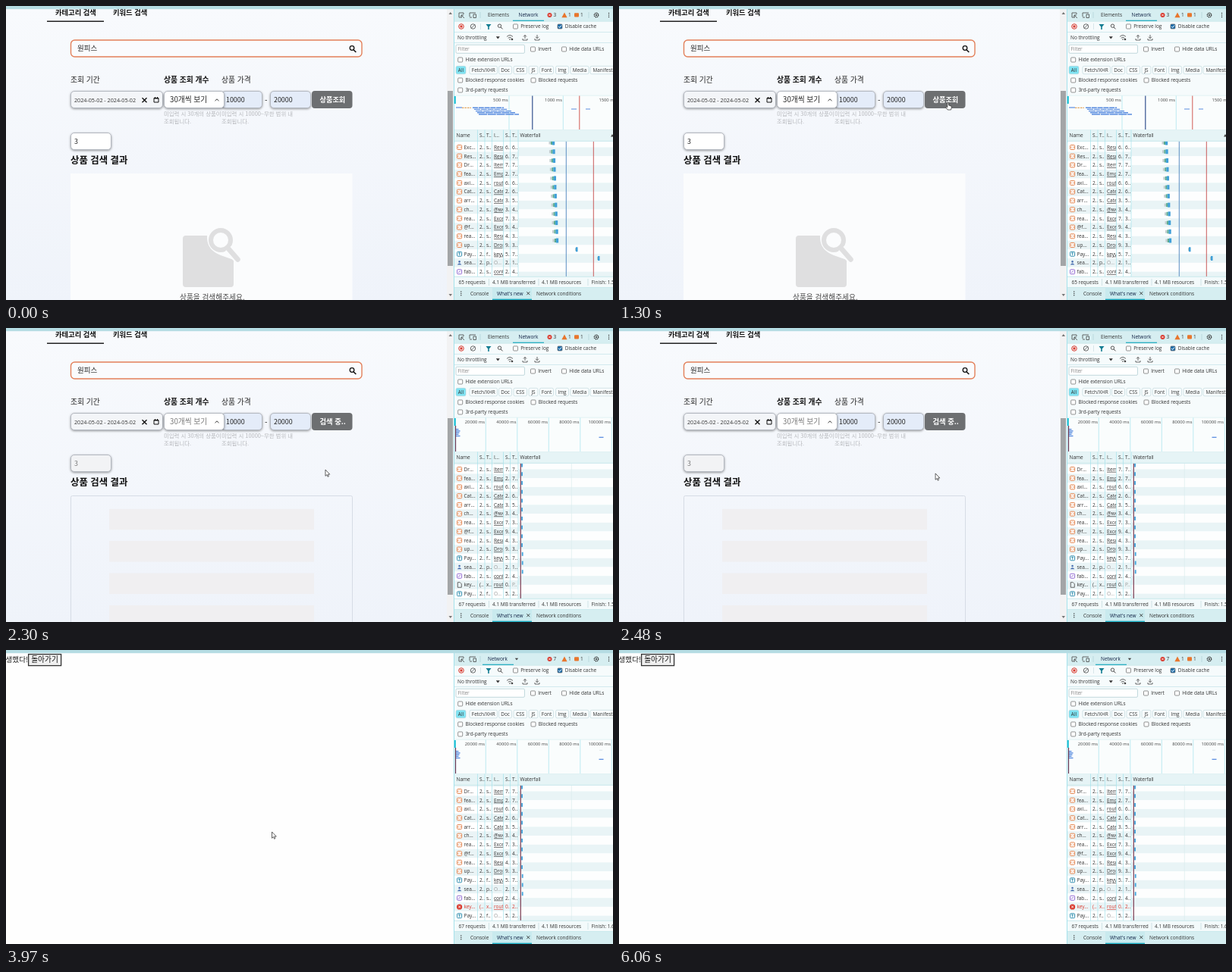
An HTML page for the animation above (6420 ms loop, 800 px wide and 388 px high).

```html
<!DOCTYPE html>
<html lang="ko">
<head>
<meta charset="utf-8">
<style>
html, body { margin: 0; width: 100%; height: 100%; overflow: hidden; background: #fefefe }
svg { display: block; width: 800px; height: 388px }
text { white-space: pre }
.page text { font-family: "Noto Sans CJK KR", "Noto Sans CJK", "Noto Sans", sans-serif }
.tools text { font-family: "Open Sans", "Noto Sans", sans-serif }
.lift { filter: drop-shadow(0 1px 1.5px #0006) }
</style>
</head>
<body>
<svg viewBox="0 0 800 388">
  <defs>
    <linearGradient id="sky" x2="0" y2="1"><stop stop-color="#f8fafd"/><stop offset="1" stop-color="#eff3fa"/></linearGradient>
    <linearGradient id="shine"><stop stop-color="#d4d4d6" stop-opacity="0"/><stop offset=".5" stop-color="#d4d4d6"/><stop offset="1" stop-color="#d4d4d6" stop-opacity="0"/></linearGradient>
    <clipPath id="view"><path d="M0 4H581V388H0Z"/></clipPath>
    <clipPath id="bars"><path id="barShape"/></clipPath>
    <clipPath id="list"><path d="M591 178.5H800V357H591Z"/></clipPath>
    <clipPath id="link"><path d="M641 0H655.5V500H641Z"/></clipPath>
  </defs>
  <g class="page" id="page"></g>
  <g class="tools" id="tools"></g>
  <g id="cursor"></g>
</svg>
<script>
const $ = id => document.getElementById(id);
const LOOP = 6420, SEARCH = 1520, FAIL = 3520, ROW = 11.73;

// markup helpers; text is placed by its vertical centre
const text = (x, y, s, size = 6.5, fill = '#333', weight = 400, more = '') =>
  `<text x="${x}" y="${y + size * .36}" font-size="${size}" fill="${fill}" font-weight="${weight}" ${more}>${s}</text>`;
const rect = (x, y, w, h, fill, more = '') =>
  `<rect x="${x}" y="${y}" width="${w}" height="${h}" fill="${fill}" ${more}/>`;
const line = (d, stroke = '#444', width = .8, more = '') =>
  `<path d="${d}" fill="none" stroke="${stroke}" stroke-width="${width}" ${more}/>`;
const shape = (d, fill) => `<path d="${d}" fill="${fill}"/>`;
const dot = (x, y, r, fill, more = '') => `<circle cx="${x}" cy="${y}" r="${r}" fill="${fill}" ${more}/>`;
// shown only in the listed phases: i idle, b busy, e error
const on = (phases, s) => `<g data-on="${phases}">${s}</g>`;
const each = (n, f) => Array.from({ length: n }, (_, i) => f(i)).join('');

const field = (x, y, w, fill, lift = true) =>
  rect(x + .5, y + .5, w - 1, 22, fill, `rx="4.5" stroke="#b3b8c0" ${lift ? 'class="lift"' : ''}`);
const skeletonY = i => 238.7 + 42.4 * i;

function form() {
  const hint = '#b5b7bb';
  return text(65, 9, '카테고리 검색', 9.3, '#111', 700) + text(141, 9, '키워드 검색', 9.3, '#111', 700) +
    rect(54, 19.5, 75, 1.5, '#222') +
    rect(85.5, 45, 383.5, 22, '#fafbfd', 'rx="5" stroke="#e3805a" stroke-width="1.4"') +
    text(94, 56, '원피스', 9.5, '#222') +
    dot(456, 55.5, 2.8, 'none', 'stroke="#111" stroke-width="1.3"') + line('M458 57.7L461.3 61', '#111', 1.6) +
    text(85, 97, '조회 기간', 9.8, '#222', 500) + text(208, 97, '상품 조회 개수', 9.8, '#111', 700) +
    text(284, 97, '상품 가격', 9.8, '#222', 500) +
    field(85, 112, 122, '#f3f5f8') +
    text(90, 124, '2024-05-02 - 2024-05-02', 7.2, '#333', 400, 'style="font-family:\'Open Sans\',sans-serif"') +
    line('M179.5 121.2L185.5 127.2M185.5 121.2L179.5 127.2', '#111', 1.4) +
    line('M195 121.5H201V127H195ZM195 122H201M196.5 120V121M199.5 120V121', '#111', 1) +
    field(284, 112, 54, '#e4ecf9') + text(290, 124, '10000', 8.9, '#222') +
    field(208, 112, 80, '#fff') +
    on('i', text(216, 124, '30개씩 보기', 9.7, '#222')) + on('b', text(216, 124, '30개씩 보기', 9.7, '#777')) +
    line('M275.5 125.2L278 122.8L280.5 125.2', '#333', 1) +
    text(341, 124, '-', 10, '#222') +
    field(348, 112, 54, '#e4ecf9') + text(353, 124, '20000', 8.9, '#222') +
    rect(403, 112, 53.5, 23, '#6d6f71', 'rx="4"') +
    on('i', text(413.5, 123.5, '상품조회', 9.2, '#fff', 700)) +
    on('b', text(413.5, 123.5, '검색 중..', 9.3, '#fff', 700)) +
    text(208, 142.5, '미입력 시 30개의 상품이', 7.4, hint) + text(208, 152.5, '조회됩니다.', 7.4, hint) +
    text(284, 142.5, '미입력 시 10000~무한 범위 내', 7.4, hint) + text(284, 152.5, '조회됩니다.', 7.4, hint) +
    on('i', field(85, 167, 54, '#fff') + text(90, 179, '3', 8.9, '#222')) +
    on('b', field(85, 167, 54, '#f2f3f5') + text(90, 179, '3', 8.9, '#777')) +
    text(85, 204, '상품 검색 결과', 12.4, '#111', 700);
}

function results() {
  const grey = '#dfdfe0';
  return on('i', rect(85, 221, 371.5, 200, '#fbfcfd') +
      shape('M237 303H265Q264 322 283 329L300 335V367Q300 371 296 371H237Q233 371 233 367V307Q233 303 237 303Z', grey) +
      dot(283, 309, 17, '#fbfcfd') + dot(283, 309, 13, 'none', `stroke="${grey}" stroke-width="6"`) +
      line('M293 320L305 334', '#fbfcfd', 11) + line('M292 319L305.5 334.5', grey, 6.5, 'stroke-linecap="round"') +
      text(229, 384.5, '상품을 검색해주세요.', 9.7, '#444')) +
    on('b', rect(85.5, 221.5, 371, 193, 'none', 'rx="2" stroke="#d6dce5"') +
      `<g clip-path="url(#bars)">${rect(136, 230, 270, 180, '#f0eff1')}<g id="sweep">${rect(-9, 230, 18, 180, 'url(#shine)')}</g></g>`);
}

$('barShape').setAttribute('d', each(4, i => `M136 ${skeletonY(i)}h270v27.5h-270z`));
$('page').innerHTML = rect(0, 0, 800, 388, '#fefefe') +
  on('ib', rect(0, 4, 581, 384, 'url(#sky)') +
    `<g clip-path="url(#view)"><g id="scroll">${rect(0, 414, 581, 50, '#fafbfd')}${form()}${results()}</g></g>` +
    rect(581, 4, 9.5, 384, '#f2f2f3') + '<rect id="thumb" x="582" width="7" fill="#a3a5a7"/>' +
    shape('M583.5 11L585.8 8L588 11ZM583.5 380L585.8 383L588 380Z', '#777')) +
  on('e', text(-.5, 13, '생했다!', 9.6, '#222') +
    rect(29.6, 5.6, 43, 15, '#f0f0f0', 'stroke="#333" stroke-width="1.3"') + text(33.2, 13, '돌아가기', 9.7, '#111'));

const check = (x, y, s, ticked) =>
  rect(x - 3, y - 3, 6, 6, ticked ? '#1a6fb0' : '#fff', 'rx="1" stroke="#666" stroke-width=".7"') +
  (ticked ? line(`M${x - 1.8} ${y}l1.4 1.5 2.5 -3`, '#fff', 1) : '') + text(x + 6.7, y, s);

function toolbar() {
  const badges = n => dot(716.5, 12, 3, '#d93a2f') + line('M715.3 10.8l2.4 2.4M717.7 10.8l-2.4 2.4', '#fff', .8) + text(721.5, 12, n) +
    shape('M736 8.6L739.6 15.2H732.4Z', '#e8762d') + text(741, 12, 1) +
    rect(749, 9.2, 6, 5.4, '#e8762d', 'rx="1"') + text(757, 12, 1);
  const chips = [['All', 593, 13], ['Fetch/XHR', 611, 36.5], ['Doc', 649.5, 17], ['CSS', 669, 17.5], ['JS', 689, 12], ['Font', 703.5, 18], ['Img', 724.5, 17], ['Media', 744, 24], ['Manifest', 770, 33]];
  return rect(591, 4, 209, 16, '#d6eef1') +
    line('M601 15H597V9H603V11M600 12L604 16M600 12V15M600 12H603') + line('M611 14V9H619M614 15H611M616 11H619.5V15.5H616Z') +
    line('M625 8V16', '#a9ccd2', .6) +
    on('ib', text(635, 12, 'Elements') + text(675.5, 12, 'Network', 6.5, '#124') + rect(668, 18.7, 41, 1.5, '#19a8be')) +
    on('e', text(635, 12, 'Network', 6.5, '#124') + rect(628, 18.7, 41, 1.5, '#19a8be') +
      shape('M670.8 10.8H675.2L673 13.6Z', '#444')) +
    on('ib', badges(3)) + on('e', badges(7)) +
    line('M768 8V16', '#a9ccd2', .6) +
    dot(778, 12, 2.7, 'none', 'stroke="#333" stroke-width="1.4" stroke-dasharray="1.4 .7"') + dot(778, 12, 1.1, '#333') +
    each(3, i => dot(794.5, 9.5 + 2.5 * i, .7, '#333')) +
    rect(591, 20, 209, 98, '#f6fbfc') + line('M591 20.3H800M591 34.5H800M591 48.5H800M591 118.3H800M591 163.3H800', '#c3e4e9', .7) +
    dot(600, 27, 3.3, 'none', 'stroke="#d93a2f"') + rect(598.5, 25.5, 3, 3, '#d93a2f') +
    dot(615.5, 27, 3.2, 'none', 'stroke="#444" stroke-width=".8"') + line('M613.2 29.3L617.8 24.7') +
    line('M625.5 23V31', '#c3d8dc', .6) + shape('M632.5 24H639.5L636.8 27.4V31H635.2V27.4Z', '#147d92') +
    dot(650.5, 26.2, 2.2, 'none', 'stroke="#444" stroke-width=".9"') + line('M652 27.8L654.5 30.4', '#444', 1) +
    check(671.5, 27, 'Preserve log') + check(730, 27, 'Disable cache', true) +
    text(595, 42, 'No throttling') + shape('M645.8 40.3H650.8L648.3 43.6Z', '#333') +
    line('M660 40.5Q664 36.5 668 40.5M661.7 42.3Q664 40 666.3 42.3') + dot(664, 44, .8, '#444') + dot(667, 44, 1.3, '#444') +
    line('M684 43V38.5M682 40.5L684 38.4L686 40.5M681 43V45H687V43M700 38V42.5M698 40.7L700 42.8L702 40.7M697 43V45H703V43') +
    rect(593, 51.3, 90.5, 11, '#fff', 'rx="1.5" stroke="#a9c9cf" stroke-width=".7"') + text(595.5, 57, 'Filter', 6.5, '#888') +
    check(694.5, 57, 'Invert') + check(735.5, 57, 'Hide data URLs') + check(598.7, 71, 'Hide extension URLs') +
    chips.map(([s, x, w], i) => rect(x, 79.3, w, 10.5, i ? '#f8fcfd' : '#7fe3f2', 'rx="2" stroke="#b9d3d8" stroke-width=".6"') +
      text(x + w / 2, 84.5, s, 6.4, '#333', 400, 'text-anchor="middle"')).join('') +
    check(598.7, 98, 'Blocked response cookies') + check(695, 98, 'Blocked requests') + check(598.7, 111, '3rd-party requests');
}

function overview() {
  const ticks = (step, first, gap, n) => each(n, i => line(`M${first + gap * i} 118.5V163`, '#a5e2ec', .7) +
    text(first - 1.3 + gap * i, 124, `${step * (i + 1)} ms`, 5.8, '#444', 400, 'text-anchor="end"'));
  const blue = '#5a8de0';
  return rect(591, 118.5, 209, 44.5, '#fafdfd') +
    on('i', ticks(500, 663, 71.3, 3) + line('M593 134H601', blue, 1.2) + line('M601 134.3H613', '#e2a660', 1.2, 'stroke-dasharray="2.5 1"') +
      each(5, i => line(`M${615 + i * 2} ${134.2 + i * 2.2}H${656 + i * 5}`, blue, 1.4, `stroke-dasharray="${7 + i} .8"`)) +
      line('M745 136H752M764 136H770', blue, 1.2) +
      line('M693.8 118.5V163', '#34508f', 1.2) + line('M755.8 118.5V163', '#d05a55', 1)) +
    on('be', ticks(20000, 632.3, 41.5, 5) +
      each(5, i => line(`M593 ${133.7 + i * 2.2}H${596.5 + (i * 2) % 3}`, blue, 1.4)) +
      line('M592.5 129V163', '#5a3350', 1.2) + `<g id="late">${line('M781.5 144.3H787.5', blue, 1.3)}</g>`) +
    on('e', line('M782 132.3H786', '#c9d6dc', .6)) +
    rect(590.8, 119, 2, 10, '#19c0d4');
}

const rows = ['Exc s Resu 6 6', 'Res s Resu 6 7', 'Dr s Item 7 7', 'fea s Emp 2 7', 'axi s rout 6 6', 'Cat s Cate 2 6', 'arr s Cate 3 5', 'ch s @we 3 4',
  'rea s Exce 7 3', '@f s Exce 9 4', 'rea s Resu 4 3', 'up s Drop 9 3', 'Pay f keyv 5 7', 'sea p O… 2 1', 'fab s cont 2 4', 'key x rout 0 P', 'Pay f O… 5 2'];

function icon(i, y) {
  const box = (color, inner) => rect(594.6, y - 3, 6, 6, '#fff', `rx="1" stroke="${color}" stroke-width=".9"`) + inner;
  if (i < 12) return box('#e07a3f', line(`M596.7 ${y - 1.3}l-1 1.3 1 1.3M598.5 ${y - 1.3}l1 1.3 -1 1.3`, '#e07a3f', .7));
  if (i == 12 || i == 16) return box('#1e84a8', line(`M596 ${y - 1.4}h3.2M597.6 ${y - 1.4}v3.2`, '#1e84a8', .8));
  if (i == 13) return dot(597.6, y - 1.6, 1.3, '#4a6fb0') + shape(`M594.8 ${y + 2.6}q2.8 -4 5.6 0z`, '#4a6fb0');
  if (i == 14) return box('#8a5fd0', line(`M596 ${y + 1.5}l3 -3`, '#8a5fd0', .9));
  return on('b', line(`M595.3 ${y - 3.3}h3l2 2v4.6h-5z`, '#444', .8)) +
    on('e', dot(597.6, y, 3.6, '#d93a2f') + line(`M596.2 ${y - 1.4}l2.8 2.8M599 ${y - 1.4}l-2.8 2.8`, '#fff', .9));
}

function row(s, i) {
  const [name, type, from, size, time] = s.split(' '), y = 186.5 + ROW * i;
  const cells = (color, last) => text(603.5, y, name + '...', 6.5, color) + text(624, y, i == 15 ? '(..' : '2..', 6.5, color) +
    text(633, y, type + '..', 6.5, color) +
    (from == 'O…' ? text(643, y, 'O...', 6.5, '#999')
      : text(643, y, from, 6.5, color, 400, 'text-decoration="underline" clip-path="url(#link)"')) +
    text(658, y, size + '..', 6.5, color) + text(667, y, last + '..', 6.5, last == 'P' ? '#999' : color);
  return rect(591, y - ROW / 2, 84, ROW, i % 2 ? '#eaf4f6' : '#fff') +
    (i == 15 ? on('b', cells('#333', 'P')) + on('e', cells('#d93a2f', 2)) : cells('#333', time)) + icon(i, y);
}

// the chart rows sit half a row above the text rows
function waterfall() {
  const top = i => 177.5 + ROW * i;
  const mark = i => i < 12
    ? rect(715.5 + i * .45, top(i) + 1, 2.5, 4, '#c3cdd0') + rect(718 + i * .45, top(i) + .5, 2, 5, '#58ab8d') + rect(720 + i * .45, top(i), 3.2, 6, '#3f9fd8')
    : rect(i == 12 ? 751 : 780, top(i), 2.5, 6, '#3f9fd8') + rect(i == 12 ? 750 : 779, top(i) + 1, 1, 4, '#b5c8c8');
  return rect(675, 178, 125, 180, '#fff') + each(16, i => rect(675, 174.7 + ROW * i, 125, ROW, i % 2 ? '#e9f4f6' : '#fdfefe')) +
    on('i', each(14, mark) + line('M738.3 178V357', '#5d8fc4', 1) + line('M774.3 178V357', '#c85a5a', 1)) +
    on('be', line('M745.3 178V357', '#dcebee', .7) + line('M678.3 178V357', '#7a3b52', 1.2) +
      each(13, i => rect(679.2 + (i > 9 ? .6 : 0), top(i) + 1, 1.8, 5, '#3f9fd8')));
}

function table() {
  const columns = [621.5, 631, 640.5, 655.5, 664.5, 675];
  const moved = rows.map(row).join('');
  return `<g clip-path="url(#list)">${on('i', moved)}${on('be', `<g transform="translate(0 ${-2 * ROW})">${moved}</g>`)}${waterfall()}</g>` +
    rect(591, 163.5, 209, 15, '#e6f4f6') + line('M591 178.3H800', '#b9e2e8', .7) +
    columns.map(x => line(`M${x} 163.5V357`, '#a5e2ec', .7)).join('') +
    [['Name', 593.5], ['S..', 624], ['T..', 633], ['I...', 643], ['S..', 658], ['T..', 667], ['Waterfall', 677.5]].map(([s, x]) => text(x, 171, s)).join('') +
    on('i', shape('M797 172.5L799 169L801 172.5Z', '#444'));
}

function footer() {
  return rect(591, 357, 209, 31, '#f3fafb') + line('M591 357.3H800M591 371.5H800', '#b9e2e8', .7) +
    on('i', text(596.5, 364.5, '65 requests')) + on('be', text(596.5, 364.5, '67 requests')) +
    text(641, 364.5, '4.1 MB transferred') + text(706, 364.5, '4.1 MB resources') +
    on('ib', text(771.5, 364.5, 'Finish: 1.5')) + on('e', text(771.5, 364.5, 'Finish: 1.6')) +
    line('M636.5 360V369M702 360V369M767 360V369', '#b9d3d8', .6) +
    rect(591, 372, 209, 16, '#d6eef1') + each(3, i => dot(599.8, 377 + 2.4 * i, .7, '#333')) +
    text(612, 379.5, 'Console') + rect(641, 372, 52, 16, '#c9eaee') + text(647, 379.5, "What's new", 6.5, '#124') +
    line('M686.3 377.2l4 4M690.3 377.2l-4 4', '#333', .9) + rect(641, 386.6, 52, 1.4, '#19a8be') + text(699, 379.5, 'Network conditions');
}

$('tools').innerHTML = rect(590, 4, 1.2, 384, '#a5e2ec') + toolbar() + overview() + table() + footer() + rect(0, 0, 800, 4.2, '#b5dce3');

$('cursor').innerHTML =
  '<path id="arrow" d="M0 0V8.3L1.9 6.6 3.1 9.3 4.4 8.7 3.2 6.1H5.8Z" fill="#fff" stroke="#222" stroke-width=".7"/>' +
  '<path id="hand" d="M-1.2 -3Q-.2 -4 .6 -3V0L4 1.2Q4.6 1.6 4.3 3L3.5 6H-.8L-3.4 2.6Q-3 1.2 -1.2 2.6Z" fill="#fff" stroke="#222" stroke-width=".7"/>';

const path = [[90, 640, 388], [430, 505, 250], [730, 446, 165], [1000, 437, 140], [1300, 434, 131], [1520, 434, 131], [1640, 430, 149], [2300, 421, 187],
  [2850, 409, 202], [3210, 365.5, 229], [3480, 359, 232], [3970, 350.5, 240], [4330, 350.5, 240], [4360, 350, 240.5], [5060, 350, 240.5], [5700, 486, 310], [6060, 676, 389]];

function pointAt(t) {
  const k = path.findIndex(p => p[0] > t);
  if (k < 1) return null;
  const [a, x, y] = path[k - 1], [b, u, v] = path[k], f = (t - a) / (b - a);
  return [x + (u - x) * f, y + (v - y) * f];
}

const show = (el, yes) => el.style.display = yes ? '' : 'none';
const move = (el, x, y) => el.setAttribute('transform', `translate(${x} ${y})`);
const parts = [...document.querySelectorAll('[data-on]')];
let shown;

function draw(now) {
  const t = now % LOOP, phase = t < SEARCH ? 'i' : t < FAIL ? 'b' : 'e';
  if (phase != shown) {
    shown = phase;
    for (const el of parts) show(el, el.dataset.on.includes(phase));
  }
  const f = Math.min(1, Math.max(0, (t - 2480) / 150)), eased = f * f * (3 - 2 * f);
  move($('scroll'), 0, -39 * eased);
  $('thumb').setAttribute('y', phase == 'i' ? 112 : 119 + 23.5 * eased);
  $('thumb').setAttribute('height', phase == 'i' ? 231 : 233);
  move($('sweep'), 136 + (t - SEARCH - 10) * .71, 0);
  show($('late'), t >= 1700);

  const p = pointAt(t);
  show($('cursor'), p);
  if (p) {
    const [x, y] = p, hand = phase == 'i' && x > 403 && x < 456 && y > 112 && y < 135;
    move($('cursor'), x, y);
    show($('hand'), hand);
    show($('arrow'), !hand);
  }
  requestAnimationFrame(draw);
}
requestAnimationFrame(draw);
</script>
</body>
</html>
```
